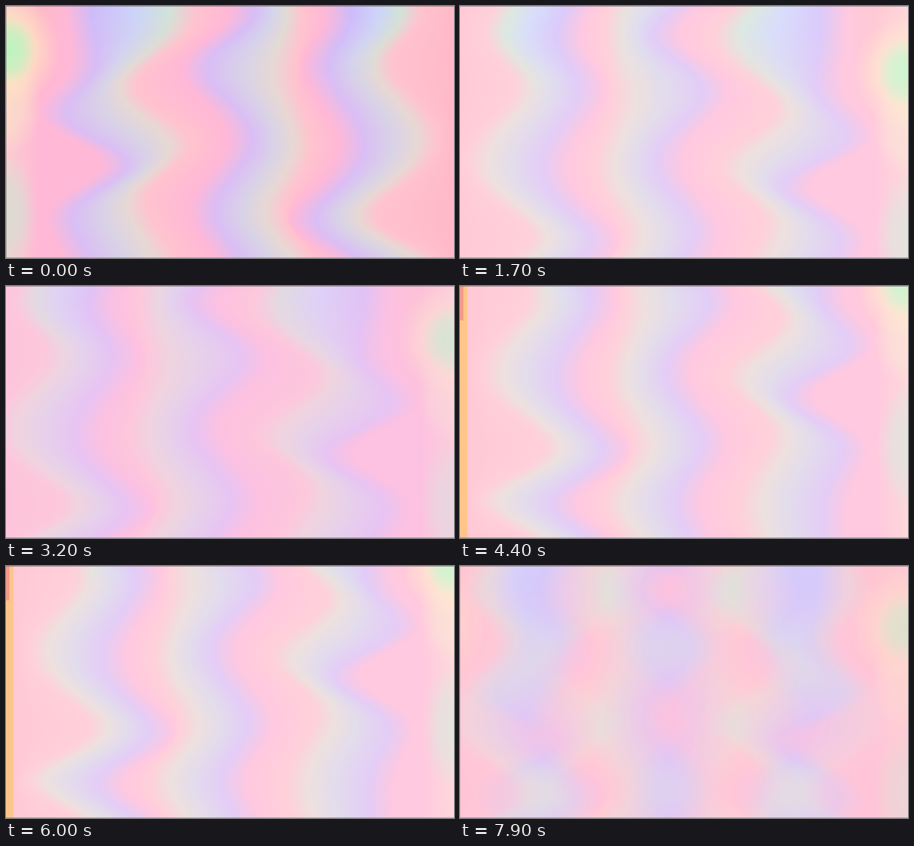
These frames come from a looping animation (560x315 px, 8 s). An HTML page with a canvas:

```html
<!DOCTYPE html>
<html lang="en">
<head>
<meta charset="utf-8">
<title>Holographic foil</title>
<style>
  html, body { margin: 0; width: 100%; height: 100%; overflow: hidden; background: #ffc4d8; }
  canvas { display: block; width: 100vw; height: 100vh; }
</style>
</head>
<body>
<canvas id="stage" width="560" height="315"></canvas>
<script>
const W = 560, H = 315, LOOP = 8000, STEP = 100;
const TOP = 40, FOIL_H = 450, PERIOD = 164;
const ctx = document.getElementById('stage').getContext('2d');

const PINK = [255, 184, 214], ROSE = [255, 184, 199], LAVENDER = [218, 190, 245];
const GREY = [217, 211, 230], BEIGE = [231, 216, 212], PEACH = [255, 195, 206];
const VIOLET = [206, 187, 250], SKY = [203, 213, 250], MINT = [208, 227, 216];
const WHITE = [255, 248, 250], ORCHID = [250, 205, 240];

// Every edge is a wave around x, strongest at y = focus and fading over spread.
const bands = [
  { skew: -8, glow: 1,
    left:  { x: 100, sway: 45, lag: 38, focus: 190, spread: 100 },
    right: { x: 190, sway: 38, lag: 10, focus: 40,  spread: 300 } },
  { skew: 8, glow: 0.3,
    left:  { x: 275, sway: 30, lag: 5, focus: 60,  spread: 300 },
    right: { x: 358, sway: 20, lag: 3, focus: 290, spread: 200 } },
  { skew: 15, glow: 1,
    left:  { x: 414, sway: 33, lag: 5, focus: 280, spread: 250 },
    right: { x: 495, sway: 42, lag: 0, focus: 270, spread: 250 } }
];

const clamp = (v, lo = 0, hi = 1) => Math.min(hi, Math.max(lo, v));
const lerp = (a, b, k) => a + (b - a) * k;
const mix = (a, b, k) => a.map((v, i) => lerp(v, b[i], k));
const rgb = (c, a = 1) => `rgba(${c.map(Math.round)},${a})`;

function edgeX(edge, skew, y) {
  const bent = y - skew * Math.sin(Math.PI * (y - 170) / 160);
  const reach = edge.sway * Math.exp(-(((y - edge.focus) / edge.spread) ** 2));
  return edge.x + reach * Math.cos(2 * Math.PI * (bent - edge.lag) / PERIOD);
}

function blob(g, x, y, rx, ry, color, alpha) {
  g.save();
  g.translate(x, y + TOP);
  g.scale(rx, ry);
  const fill = g.createRadialGradient(0, 0, 0, 0, 0, 1);
  fill.addColorStop(0, rgb(color, alpha));
  fill.addColorStop(0.5, rgb(color, alpha * 0.75));
  fill.addColorStop(1, rgb(color, 0));
  g.fillStyle = fill;
  g.fillRect(-1, -1, 2, 2);
  g.restore();
}

function makeFoil() {
  const foil = document.createElement('canvas');
  foil.width = W;
  foil.height = FOIL_H;
  const g = foil.getContext('2d');
  for (let row = 0; row < FOIL_H; row++) {
    const y = row - TOP;
    const fill = g.createLinearGradient(0, 0, W, 0);
    const stop = (x, c) => fill.addColorStop(clamp(x / W), rgb(c));
    stop(0, [253, 205, 207]);
    stop(42, mix(PINK, ROSE, clamp(1 - y / 150)));
    for (const { left, right, skew, glow } of bands) {
      const l = edgeX(left, skew, y), r = edgeX(right, skew, y);
      const shine = glow * clamp(1 - y / 100);
      stop(l - 26, PINK);
      stop(l + 7, mix(LAVENDER, VIOLET, shine));
      stop(lerp(l, r, 0.5), mix(GREY, SKY, shine));
      stop(lerp(l, r, 0.82), mix(BEIGE, MINT, shine));
      stop(r + 10, PEACH);
    }
    stop(W, ROSE);
    g.fillStyle = fill;
    g.fillRect(0, row, W, 1);
  }
  blob(g, 0, 125, 45, 60, [250, 225, 200], 0.7);
  blob(g, 0, 260, 40, 80, [214, 222, 212], 0.9);
  blob(g, 5, 55, 62, 70, [255, 232, 190], 0.9);
  blob(g, 4, 55, 34, 44, [184, 244, 194], 0.95);
  return foil;
}

const foil = makeFoil();

// flip: share of the mirrored foil, stretch: width from the right edge, blush: orchid tint
const poses = [
  { t: 0,    shift: 0,   flip: 0,   stretch: 1,     blush: 0 },
  { t: 1700, shift: 28,  flip: 1,   stretch: 1.02,  blush: 0 },
  { t: 3200, shift: 12,  flip: 1,   stretch: 1.06,  blush: 1 },
  { t: 4400, shift: -60, flip: 1,   stretch: 0.983, blush: 0 },
  { t: 6000, shift: -60, flip: 1,   stretch: 0.983, blush: 0 },
  { t: 7200, shift: -28, flip: 0,   stretch: 0.986, blush: 0 },
  { t: 7900, shift: 22,  flip: 0.6, stretch: 1.07,  blush: 0.2 }
];

function poseAt(t) {
  const n = poses.findIndex(p => p.t > t);
  if (n < 0) return poses[poses.length - 1];
  const a = poses[n - 1], b = poses[n], u = (t - a.t) / (b.t - a.t);
  const k = u * u * (3 - 2 * u), pose = {};
  for (const key in a) pose[key] = lerp(a[key], b[key], k);
  return pose;
}

function rect(x, y, w, h, color, alpha = 1) {
  ctx.fillStyle = rgb(color, alpha);
  ctx.fillRect(x, y, w, h);
}

function drawFoil(p) {
  const y = p.shift - TOP;
  ctx.save();
  ctx.translate(W * (1 - p.stretch), 0);
  ctx.scale(p.stretch, 1);
  ctx.drawImage(foil, 0, y);
  ctx.globalAlpha = p.flip;
  ctx.translate(W, 0);
  ctx.scale(-1, 1);
  ctx.drawImage(foil, 0, y);
  ctx.restore();
}

function draw(t) {
  const p = poseAt(t), gap = W * (1 - p.stretch);
  drawFoil(p);
  rect(0, 0, W, H, mix(WHITE, ORCHID, p.blush), p.flip * lerp(0.26, 0.4, p.blush));

  // A foil narrower than the stage bares a strip on the left.
  if (gap > 0) {
    rect(0, 0, gap, H, mix([219, 223, 149], [255, 197, 139], p.flip));
    rect(0, 0, gap * lerp(1, 0.45, p.flip), 43, mix([158, 235, 155], [243, 154, 136], p.flip));
  }

  const line = [117, 102, 108];
  rect(0, 0, W, 1, line, 0.5);
  rect(0, H - 1, W, 1, line, 0.4);
  rect(0, 0, 1, H, line, 0.4 * (1 - p.flip));
}

const start = performance.now();
function tick() {
  const t = (performance.now() - start) % LOOP;
  draw(Math.floor(t / STEP) * STEP);
  requestAnimationFrame(tick);
}
tick();
</script>
</body>
</html>
```
